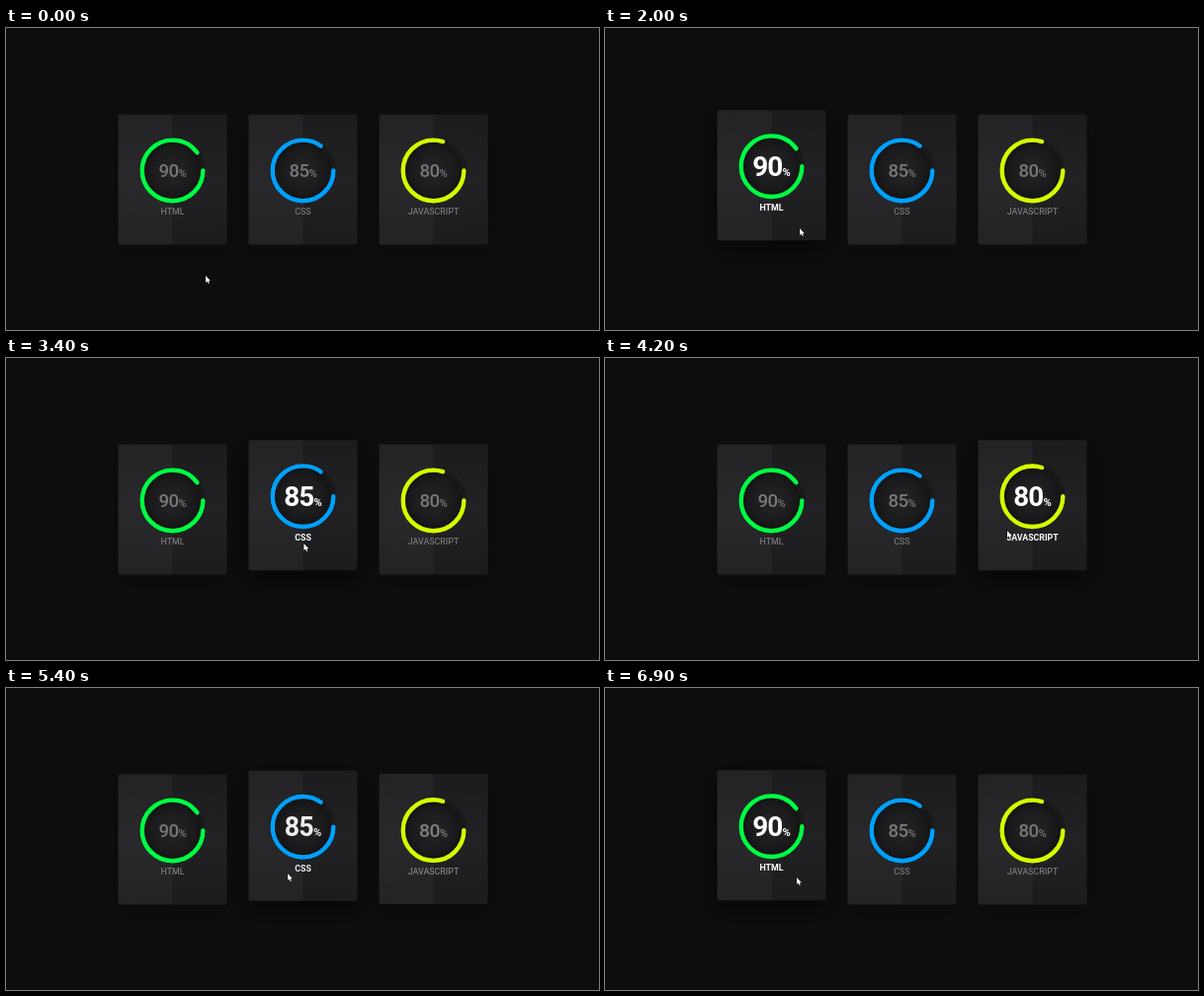
Recreate the animation shown at these times as an HTML page with a canvas. Size 600 px wide and 306 px high, loop 7 s.

```html
<!DOCTYPE html>
<html lang="en">
<head>
<meta charset="utf-8">
<title>Skill cards</title>
<style>
  html, body { margin: 0; width: 100%; height: 100%; overflow: hidden; background: #0e0c0f; }
  canvas { display: block; }
</style>
</head>
<body>
<canvas id="stage" width="600" height="306"></canvas>
<script>
const ctx = document.getElementById('stage').getContext('2d');
const LOOP = 7000, FADE = 500, TAU = Math.PI * 2;
const CARD = { left: 113.5, top: 87.4, w: 110, h: 132, gap: 22, lift: 4.2, corner: 1.8 };
const RING = { outer: 33, width: 4.4, dy: 57 };
const FONT = 'Roboto, sans-serif';

const cards = [
  { value: 90, label: 'HTML', color: '#00ff43' },
  { value: 85, label: 'CSS', color: '#00a1ff' },
  { value: 80, label: 'JAVASCRIPT', color: '#d5ff00' },
];

const home = { x: 202, y: 251 };
const moves = [
  { start: 1050, time: 650, x: 197, y: 203 },
  { start: 2420, time: 680, x: 301, y: 188 },
  { start: 3380, time: 600, x: 407, y: 175 },
  { start: 4930, time: 400, x: 285, y: 188 },
  { start: 5840, time: 500, x: 194, y: 192 },
];

const lerp = (a, b, k) => a + (b - a) * k;
const clamp = v => Math.min(1, Math.max(0, v));
const smooth = v => { const k = clamp(v); return k * k * (3 - 2 * k); };

// cubic-bezier(.25, .1, .25, 1)
function ease(x) {
  if (x <= 0 || x >= 1) return clamp(x);
  const bezier = (a, b, s) => 3 * a * s * (1 - s) ** 2 + 3 * b * s * s * (1 - s) + s ** 3;
  let lo = 0, hi = 1;
  for (let i = 0; i < 18; i++) {
    const mid = (lo + hi) / 2;
    if (bezier(.25, .25, mid) < x) lo = mid; else hi = mid;
  }
  return bezier(.1, 1, lo);
}

function pointerAt(t) {
  return moves.reduce((p, m) => {
    const k = smooth((t - m.start) / m.time);
    return { x: lerp(p.x, m.x, k), y: lerp(p.y, m.y, k) };
  }, home);
}

function isOver(card, p) {
  return p.x > card.x && p.x < card.x + CARD.w && p.y > CARD.top && p.y < CARD.top + CARD.h;
}

// Follow the pointer once to find when it enters and leaves each card.
cards.forEach((card, i) => {
  card.x = CARD.left + i * (CARD.w + CARD.gap);
  card.changes = [];
  let over = false;
  for (let t = 0; t < LOOP; t += 10) {
    if (isOver(card, pointerAt(t)) === over) continue;
    over = !over;
    card.changes.push({ t, sign: over ? 1 : -1 });
  }
});

function hoverAmount(card, t) {
  return clamp(card.changes.reduce((k, c) => k + c.sign * ease((t - c.t) / FADE), 0));
}

function gradient(g, ...colors) {
  colors.forEach((color, i) => g.addColorStop(i / (colors.length - 1), color));
  return g;
}

function panel(x, y, w, fill) {
  ctx.fillStyle = fill;
  ctx.beginPath();
  ctx.roundRect(x, y, w, CARD.h, CARD.corner);
  ctx.fill();
}

function drawPanel(x, y, k) {
  ctx.save();
  ctx.shadowColor = `rgba(0,0,0,${lerp(.15, .6, k)})`;
  ctx.shadowOffsetY = 8;
  ctx.shadowBlur = 22;
  panel(x, y, CARD.w, gradient(ctx.createLinearGradient(0, y, 0, y + CARD.h), '#1c1b1d', '#222123', '#1c1b1d'));
  ctx.restore();
  panel(x, y, CARD.w / 2, 'rgba(255,255,255,.03)');
}

function drawRing(cx, cy, card) {
  const shade = a => `rgba(0,0,0,${a})`;
  const arc = (r, part) => {
    ctx.beginPath();
    ctx.arc(cx, cy, r, 0, TAU * part);
  };
  arc(RING.outer, 1);
  ctx.fillStyle = '#222123';
  ctx.fill();
  ctx.fillStyle = gradient(ctx.createRadialGradient(cx, cy, 0, cx, cy, RING.outer),
    shade(.01), shade(.05), shade(.22), shade(.54));
  ctx.fill();

  ctx.lineWidth = RING.width;
  ctx.lineCap = 'round';
  for (const [part, color] of [[1, '#191919'], [card.value / 100, card.color]]) {
    arc(RING.outer - RING.width / 2, part);
    ctx.strokeStyle = color;
    ctx.stroke();
  }
}

function setFont(weight, size, spacing = 0) {
  ctx.font = `${weight} ${size}px ${FONT}`;
  ctx.letterSpacing = `${spacing * size}px`;
}

function drawText(cx, cy, card, k) {
  const shade = Math.round(lerp(119, 255, k));
  const weight = Math.round(lerp(500, 700, k));
  const size = lerp(18.6, 27.9, k);
  const baseline = cy + size * .3415 + .2;
  const numberFont = () => setFont(weight, size, -.03);
  const signFont = () => setFont(weight, 11.2);

  ctx.fillStyle = `rgb(${shade},${shade},${shade})`;
  ctx.textAlign = 'left';
  signFont();
  const signWidth = ctx.measureText('%').width;
  numberFont();
  const numberWidth = ctx.measureText(card.value).width;
  const left = cx - (numberWidth + signWidth) / 2;
  ctx.fillText(card.value, left, baseline);
  signFont();
  ctx.fillText('%', left + numberWidth, baseline);

  ctx.textAlign = 'center';
  setFont(weight, 8.8);
  ctx.fillText(card.label, cx, cy + 44.9);
}

function drawCard(card, t) {
  const k = hoverAmount(card, t);
  const y = CARD.top - CARD.lift * k;
  const cx = card.x + CARD.w / 2, cy = y + RING.dy;
  drawPanel(card.x, y, k);
  drawRing(cx, cy, card);
  drawText(cx, cy, card, k);
}

const arrow = new Path2D('M0 0V7L1.6 5.6L2.7 8L3.8 7.5L2.8 5.2H5Z');

function drawPointer({ x, y }) {
  ctx.save();
  ctx.translate(x, y);
  ctx.lineJoin = 'round';
  ctx.lineWidth = .8;
  ctx.strokeStyle = '#000';
  ctx.stroke(arrow);
  ctx.fillStyle = '#fff';
  ctx.fill(arrow);
  ctx.restore();
}

function draw(t) {
  ctx.fillStyle = '#0e0c0f';
  ctx.fillRect(0, 0, 600, 306);
  cards.forEach(card => drawCard(card, t));
  drawPointer(pointerAt(t));
}

const start = performance.now();
function tick() {
  draw((performance.now() - start) % LOOP);
  requestAnimationFrame(tick);
}
tick();
</script>
</body>
</html>
```
